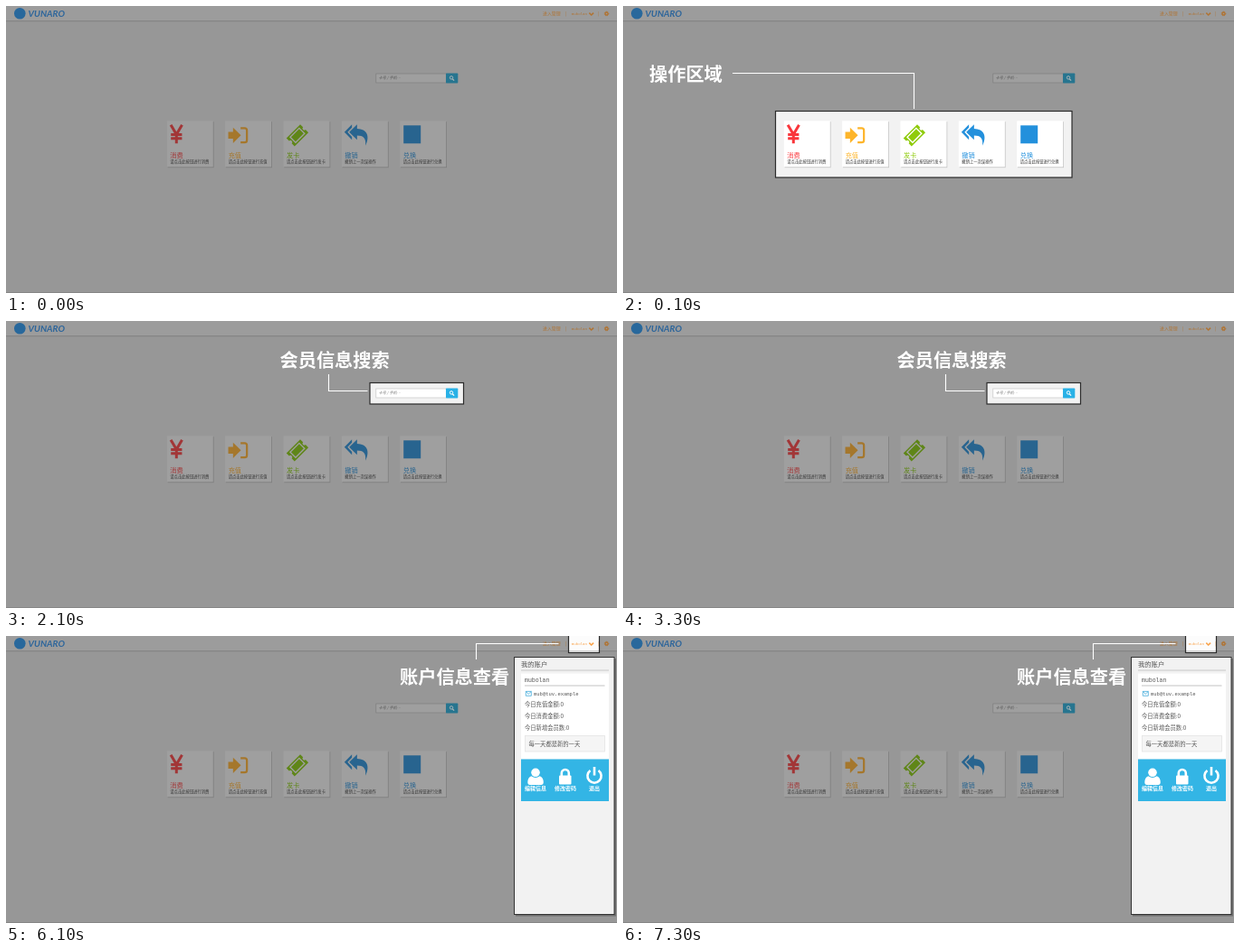
Animation, 675 px wide and 318 px high, one loop 8100 ms. Source, as an HTML page:

```html
<!DOCTYPE html>
<html lang="zh-CN">
<head>
<meta charset="utf-8">
<title>操作指引</title>
<style>
html, body { margin: 0; width: 100%; height: 100%; overflow: hidden; background: #979797; }
#stage { display: block; width: 675px; height: 318px; }
text { font-family: "Noto Sans CJK SC", "Noto Sans CJK", sans-serif; }
.mono { font-family: "Liberation Mono", monospace; }
.dim {
  --bg: #979797; --head: #9c9c9c; --edge: #858585; --card: #9f9f9f; --shadow: #7e7e7e; --ink: #333; --hint: #555;
  --red: #a23637; --yellow: #a5772c; --green: #5f8618; --blue: #28648f; --button: #27758f; --orange: #b07434; --white: #a8b4b8;
}
.lit {
  --bg: #f2f2f2; --head: #fcfcfc; --edge: #d0d0d0; --card: #fff; --shadow: #c6c6c6; --ink: #333; --hint: #777;
  --red: #f9363b; --yellow: #fdb52b; --green: #8fcb0b; --blue: #2390dc; --button: #29b1e6; --orange: #f9a24a; --white: #fff;
}
.callout { font-size: 20.2px; font-weight: 700; fill: #fff; }
.lead { fill: none; stroke: #fff; stroke-width: 1.1; }
.frame { fill: none; stroke: #2b2b2b; stroke-width: 1.2; }
.info { font-size: 6.3px; fill: #555; }
.action { font-size: 6px; font-weight: 700; fill: #fff; text-anchor: middle; }
.scene { display: none; }
.scene.on { display: inline; }
</style>
</head>
<body>
<svg id="stage" viewBox="0 0 675 318">
  <defs>
    <g id="page">
      <rect width="675" height="318" fill="var(--bg)"/>
      <rect width="675" height="16" fill="var(--head)"/>
      <path d="M0 16.7H675M0 317.5H675" stroke="var(--edge)" stroke-width="1.2"/>
      <circle cx="15.3" cy="8.2" r="6.3" fill="#28689c"/>
      <text x="24.5" y="12" font-size="10" font-weight="700" font-style="italic" fill="#2c659b" style="font-family:Lato,sans-serif">VUNARO</text>
      <g fill="var(--orange)" font-size="4.9" font-weight="500">
        <text x="593" y="10.3">进入管理</text>
        <text x="617.8" y="10">|</text>
        <text x="624.8" y="10" font-size="4.1" class="mono">mubolan</text>
        <text x="654" y="10">|</text>
        <path d="M644.3 7.6L646.7 10L649.1 7.6" fill="none" stroke="var(--orange)" stroke-width="1.5"/>
        <circle cx="663.5" cy="8.5" r="1.5" fill="none" stroke="var(--orange)" stroke-width="1.4"/>
        <circle cx="663.5" cy="8.5" r="2.3" fill="none" stroke="var(--orange)" stroke-dasharray=".9 .9"/>
      </g>
      <rect x="408.8" y="75" width="77.5" height="10" fill="var(--card)" stroke="var(--shadow)" stroke-width=".7"/>
      <text x="411.5" y="81.4" font-size="4.2" font-style="italic" fill="var(--hint)">卡号 / 手机…</text>
      <rect x="486" y="74.5" width="13.3" height="11" rx=".7" fill="var(--button)"/>
      <path d="M493.2 80.7L495 82.6" stroke="var(--white)" stroke-width="1.3"/>
      <circle cx="492" cy="79.4" r="1.7" fill="none" stroke="var(--white)"/>
      <g id="cards"></g>
    </g>
  </defs>
  <use href="#page" class="dim"/>
  <g id="scenes"></g>
</svg>
<script>
// Icons are drawn relative to their card's top left corner.
const cards = [
  ['red', '消费', '请点击此按钮进行消费',
    '<path d="M4.3 4.5L10.5 15L16.7 4.5M10.5 14V25M4.4 15.3H16.6M4.4 19.4H16.6" fill="none" stroke="var(--red)" stroke-width="3"/>'],
  ['yellow', '充值', '请点击此按钮进行充值',
    '<path d="M3.4 12.2H8.7V7.4L17.4 16L8.7 24.6V19.8H3.4Z"/><path d="M17 8.1H21.5Q24 8.1 24 10.6V21.4Q24 23.9 21.5 23.9H17" fill="none" stroke="var(--yellow)" stroke-width="2.2"/>'],
  ['green', '发卡', '请点击此按钮进行发卡',
    '<g transform="translate(15.4 16) rotate(-45)"><path d="M-10.8-6.4H10.8V-2A2 2 0 0 0 10.8 2V6.4H-10.8V2A2 2 0 0 0-10.8-2Z"/><rect x="-7" y="-4.2" width="14" height="8.4" fill="none" stroke="var(--card)" stroke-width="1.4"/></g>'],
  ['blue', '撤销', '撤销上一次误操作',
    '<path d="M11.3 4L3 12.5L11.3 21V17.6L6.5 12.5L11.3 7.4Z"/><path d="M8.3 12.5L17 4V8.8C28 9 31.5 17 26.3 27.5C27 19 24 16.3 17 16.3V21Z"/>'],
  ['blue', '兑换', '请点击此按钮进行兑换',
    '<rect x="4" y="5" width="19" height="20"/>']
];

document.getElementById('cards').innerHTML = cards.map(([color, title, note, icon], i) => `
  <g transform="translate(${177.8 + 64.35 * i} 127.3)">
    <rect x=".8" y=".9" width="51" height="51" fill="var(--shadow)"/>
    <rect width="51" height="51" fill="var(--card)"/>
    <g fill="var(--${color})">${icon}<text x="3.5" y="40.3" font-size="7.2">${title}</text></g>
    <text x="3.5" y="46.9" font-size="4.3" fill="var(--ink)">${note}</text>
  </g>`).join('');

const account = `
  <rect x="563" y="25" width="111" height="285.5" fill="#555" opacity=".6"/>
  <rect x="561.5" y="23.5" width="110.5" height="285" fill="#f2f2f2" stroke="#333"/>
  <text x="569" y="34" font-size="7.3" fill="#555">我的账户</text>
  <path d="M569 38H666" stroke="#c8c8c8"/>
  <rect x="569" y="41.5" width="97" height="95" fill="#fff"/>
  <text x="573" y="51" font-size="6.5" fill="#555" class="mono">mubolan</text>
  <path d="M573 55H661.5" stroke="#bbb" stroke-width=".9"/>
  <path d="M574.3 61.4H580.3V66.3H574.3ZL577.3 64.3L580.3 61.4" fill="none" stroke="#45addb" stroke-width=".8"/>
  <text x="583" y="66.2" font-size="5.5" fill="#555" class="mono">mub@tuv.example</text>
  <g class="info">
    <text x="573" y="78.3">今日充值金额:0</text>
    <text x="573" y="91">今日消费金额:0</text>
    <text x="573" y="103.7">今日新增会员数:0</text>
    <rect x="573.5" y="110.5" width="88" height="17.5" fill="#f5f5f5" stroke="#e4e4e4" stroke-width=".8"/>
    <text x="577.5" y="121.5">每一天都是新的一天</text>
  </g>
  <rect x="569" y="136.5" width="97" height="46.5" fill="#33b5e5"/>
  <g fill="#fff">
    <circle cx="585" cy="151.3" r="4.8"/>
    <path d="M580.3 155.3Q585 158.5 589.7 155.3Q593.8 157 593.8 162Q593.8 165 591 165H579Q576.3 165 576.3 162Q576.3 157 580.3 155.3Z"/>
    <rect x="611" y="154.5" width="13.5" height="10" rx="1"/>
  </g>
  <path d="M613.8 155V152A4 4 0 0 1 621.8 152V155M645.5 149A7.6 7.6 0 1 0 654.5 149M650 145V154.5" fill="none" stroke="#fff" stroke-width="2.6"/>
  <g class="action">
    <text x="585" y="171">编辑信息</text>
    <text x="618" y="171">修改密码</text>
    <text x="650" y="171">退出</text>
  </g>`;

// Spotlight box [x, y, width, height], label, label position, leader line, extra markup.
const scenes = [
  [[168.5, 116.5, 327.5, 73.5], '操作区域', 29, 83, 'M121 74.5H321.5V114'],
  [[402, 68.5, 103.5, 23.5], '会员信息搜索', 302.5, 51, 'M356.5 59V77.5H399.5'],
  [[586.5, -2, 34, 20.5], '进入管理页面（管理员）', 321, 51, 'M540.5 44.5H601.5V21'],
  [[621.5, -2, 34, 20.5], '账户信息查看', 435, 53, 'M519.5 26V8.5H610.5', account]
];

const layer = document.getElementById('scenes');
layer.innerHTML = scenes.map(([[x, y, w, h], label, tx, ty, line, extra = '']) => {
  const box = `x="${x}" y="${y}" width="${w}" height="${h}"`;
  return `<g class="scene">
    <svg ${box} viewBox="${x} ${y} ${w} ${h}" class="lit"><use href="#page"/></svg>
    <rect ${box} class="frame"/>
    <path d="${line}" class="lead"/>
    <text x="${tx}" y="${ty}" class="callout">${label}</text>${extra}
  </g>`;
}).join('');

const LOOP = 8100, INTRO = 100, HOLD = 2000;
function draw() {
  const active = Math.floor((performance.now() % LOOP - INTRO) / HOLD);
  [...layer.children].forEach((scene, i) => scene.classList.toggle('on', i === active));
  requestAnimationFrame(draw);
}
draw();
</script>
</body>
</html>
```
